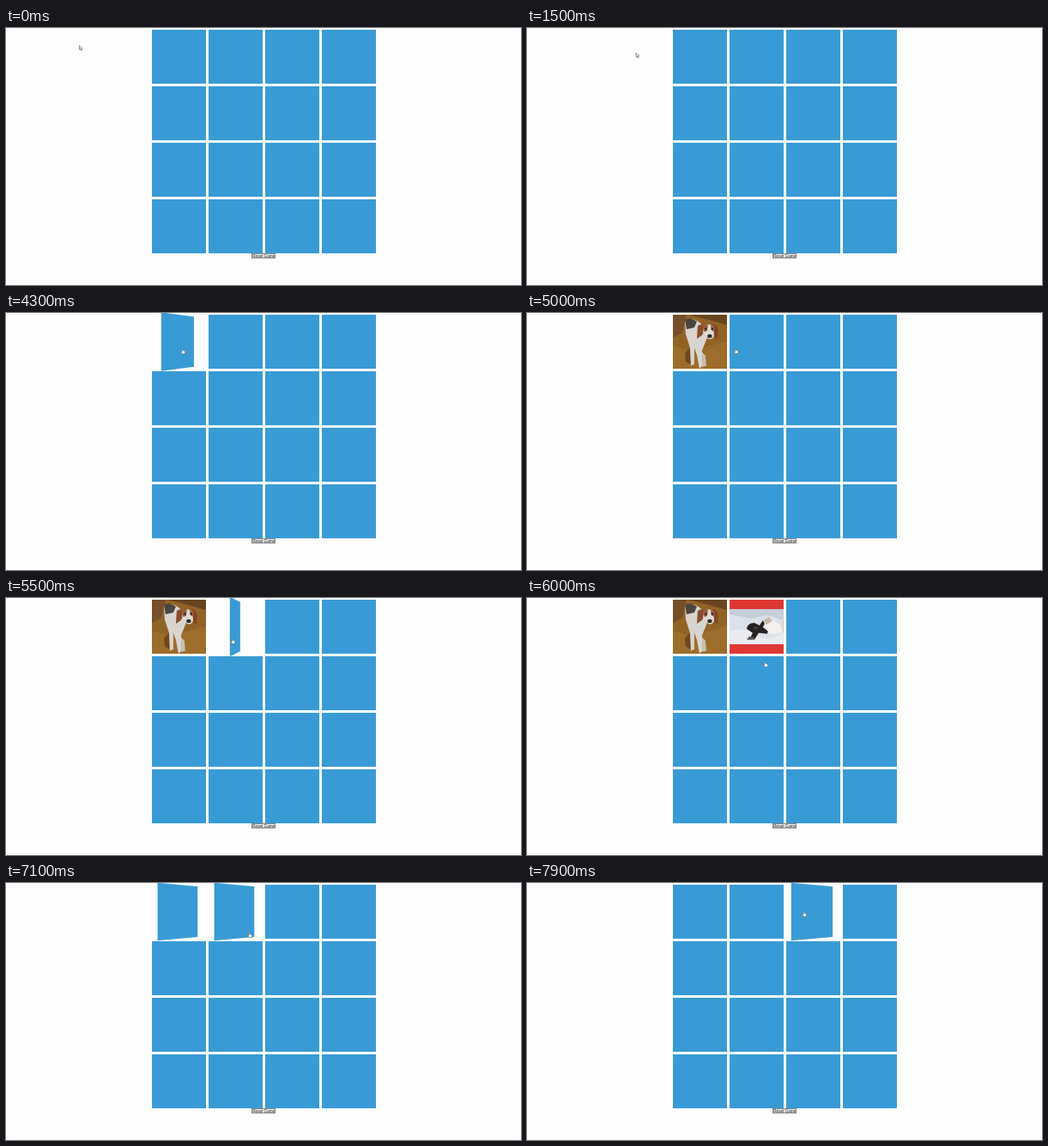
These frames come from a looping animation (600x300 px, 8000 ms). An HTML page:

```html
<!DOCTYPE html>
<html lang="en">
<head>
<meta charset="utf-8">
<title>Memory game</title>
<style>
  html, body { margin: 0; width: 100%; height: 100%; overflow: hidden; background: #fdfdfd; }
  #stage { position: relative; width: 600px; height: 300px; overflow: hidden; }
  .card { position: absolute; width: 62.8px; height: 62.8px; }
  .face { position: absolute; inset: 0; overflow: hidden; backface-visibility: hidden; }
  .front { background: #399bd5; }
  .back { background: #de3832; }
  .back svg { display: block; width: 100%; height: 100%; }
  #reset {
    position: absolute; left: 286.3px; top: 262.7px; width: 27.6px; height: 6px;
    box-sizing: border-box; border: .6px solid #858585; background: #efefef;
    color: #222; font: 4.6px/5px "Liberation Sans", Arial, sans-serif;
    text-align: center; white-space: nowrap;
  }
  #cursor { position: absolute; left: 0; top: 0; width: 8px; height: 9px; overflow: visible; }
</style>
</head>
<body>
<div id="stage">
  <div id="reset">Reset Game</div>
  <svg id="cursor" viewBox="0 0 8 9" stroke-linejoin="round">
    <path id="arrow" d="M0 0V4.9L1.1 3.9 2 5.7 2.8 5.3 2 3.6H3.5Z" fill="#fff" stroke="#444" stroke-width=".6"/>
    <path id="hand" d="M.1.3Q.7-.2 1.1.5L1.6 2.4 3.4 2.8Q4.1 3 4 3.9L3.4 6.3H.7L-1.2 3.9Q-1.2 3.2-.5 3.4L.4 4Z"
      fill="#fff" stroke="#3c4b58" stroke-width=".5"/>
  </svg>
</div>

<script>
const LOOP = 8000, STEP = 100, FLIP = 500;
const PITCH = 65.85, LEFT = 170.1, TOP = 2.1;

const houndPhoto = `
  <rect width="63" height="63" fill="#916326"/>
  <path d="M0 0H63V12L42 6 18 0Z" fill="#68451f"/>
  <path d="M0 0H16L11 21 0 27Z" fill="#76502a"/>
  <path d="M0 36L20 43 63 31V63H0Z" fill="#9d6d2b"/>
  <path d="M14 45L20 39 24 60 15 55Z" fill="#70481d"/>
  <path d="M14 7Q22 2 31 9L43 19 38 32 34 42 35 60 31 63 28 47 25 39 25 58 21 60 20 39 15 23Z" fill="#d8d5d0"/>
  <path d="M14 6Q21 2 28 8L25 15 16 17Z" fill="#4b4540"/>
  <path d="M34 44L38 48 39 60 35 61Z" fill="#c8c0b5"/>
  <path d="M29 13Q34 9 39 14L34 24 28 28Z" fill="#8a4d2b"/>
  <path d="M46 11Q51 11 53 18L52 29 48 25Z" fill="#824525"/>
  <path d="M36 13Q42 9 48 14L48 25Q45 31 40 27L35 20Z" fill="#dedad5"/>
  <path d="M35 14Q38 10 41 12L40 19 36 20ZM44 12L48 14 48 20 45 18Z" fill="#955b38"/>
  <circle cx="38.5" cy="16.5" r="1.3" fill="#332b2a"/>
  <circle cx="46" cy="16.5" r="1.3" fill="#332b2a"/>
  <ellipse cx="43" cy="25" rx="2.7" ry="2.2" fill="#302c2d"/>`;

const snowPhoto = `
  <rect width="63" height="63" fill="#de3832"/>
  <rect y="11" width="63" height="41" fill="#dce0e9"/>
  <path d="M0 11H63V24L45 18 25 22 0 17Z" fill="#c9cedb"/>
  <path d="M0 37Q18 31 31 41T63 38V52H0Z" fill="#e9ebf1"/>
  <path d="M37 25Q49 20 59 29L62 38 52 41 38 38Z" fill="#f1f0ed"/>
  <path d="M40 24L46 20 50 25 43 29Z" fill="#c2b7a9"/>
  <path d="M20 34Q21 27 29 27L35 30 39 24 41 28 39 32 45 37 44 40 34 39 29 47 24 45 27 39Z" fill="#252123"/>
  <path d="M23 43L20 47 27 47 31 45Z" fill="#5c5252"/>
  <path d="M27 32L34 32 31 35Z" fill="#4a4242"/>`;

// Cursor tip as [ms, x, y].
const cursorPath = [
  [0, 85.5, 20.5], [800, 125.5, 28.5], [1400, 125.5, 28.5],
  [1900, 141, 36], [2300, 128, 30.5], [2500, 134.7, 32.5],
  [3200, 214, 38.5], [3400, 240, 79], [3600, 240, 79],
  [4100, 204.7, 41.5], [4400, 204.7, 41.5], [5000, 242.2, 41.2],
  [5300, 260, 45], [5600, 264, 48], [6000, 276.6, 74.2],
  [6400, 282.7, 57.5], [7400, 282.7, 57.5], [7700, 321.7, 33], [LOOP, 321.7, 33]
];

const stage = document.getElementById("stage");
const cursor = document.getElementById("cursor");
const arrow = document.getElementById("arrow");
const hand = document.getElementById("hand");

function addFace(card, kind, markup = "") {
  const face = document.createElement("div");
  face.className = "face " + kind;
  face.innerHTML = markup && `<svg viewBox="0 0 63 63">${markup}</svg>`;
  card.append(face);
  return face;
}

function makeCard(index, photo) {
  const card = document.createElement("div");
  card.className = "card";
  card.style.left = LEFT + index % 4 * PITCH + "px";
  card.style.top = TOP + Math.floor(index / 4) * PITCH + "px";
  stage.insertBefore(card, cursor);
  return { front: addFace(card, "front"), back: addFace(card, "back", photo) };
}

const cards = Array.from({ length: 16 }, (_, i) => makeCard(i, [houndPhoto, snowPhoto][i]));
const flips = [
  { card: cards[0], open: 4200, close: 6868 },
  { card: cards[1], open: 5368, close: 6868 },
  { card: cards[2], open: 7816, close: Infinity }
];

// CSS "ease": cubic-bezier(.25, .1, .25, 1), solved by bisection.
function ease(x) {
  if (x <= 0) return 0;
  if (x >= 1) return 1;
  const bezier = (a, b, s) => 3 * a * s * (1 - s) ** 2 + 3 * b * s * s * (1 - s) + s ** 3;
  let low = 0, high = 1;
  for (let i = 0; i < 24; i++) {
    const mid = (low + high) / 2;
    if (bezier(.25, .25, mid) < x) low = mid; else high = mid;
  }
  return bezier(.1, 1, low);
}

function cursorAt(t) {
  const next = cursorPath.findIndex(point => point[0] > t);
  const [t0, x0, y0] = cursorPath[next - 1], [t1, x1, y1] = cursorPath[next];
  const k = (t - t0) / (t1 - t0), s = k * k * (3 - 2 * k);
  return [x0 + (x1 - x0) * s, y0 + (y1 - y0) * s];
}

const turn = angle => `perspective(320px) rotateY(${angle}deg)`;

function draw(t) {
  for (const { card, open, close } of flips) {
    const angle = 180 * (ease((t - open) / FLIP) - ease((t - close) / FLIP));
    card.front.style.transform = turn(angle);
    card.back.style.transform = turn(angle - 180);
  }
  const [x, y] = cursorAt(t);
  const overCard = x > LEFT;
  cursor.style.transform = `translate(${x}px, ${y}px)`;
  arrow.style.display = overCard ? "none" : "";
  hand.style.display = overCard ? "" : "none";
}

for (const { front, back } of cards) {
  front.style.transform = turn(0);
  back.style.transform = turn(-180);
}

const start = performance.now();
function tick() {
  const elapsed = (performance.now() - start) % LOOP;
  draw(Math.floor(elapsed / STEP) * STEP);
  requestAnimationFrame(tick);
}
tick();
</script>
</body>
</html>
```
